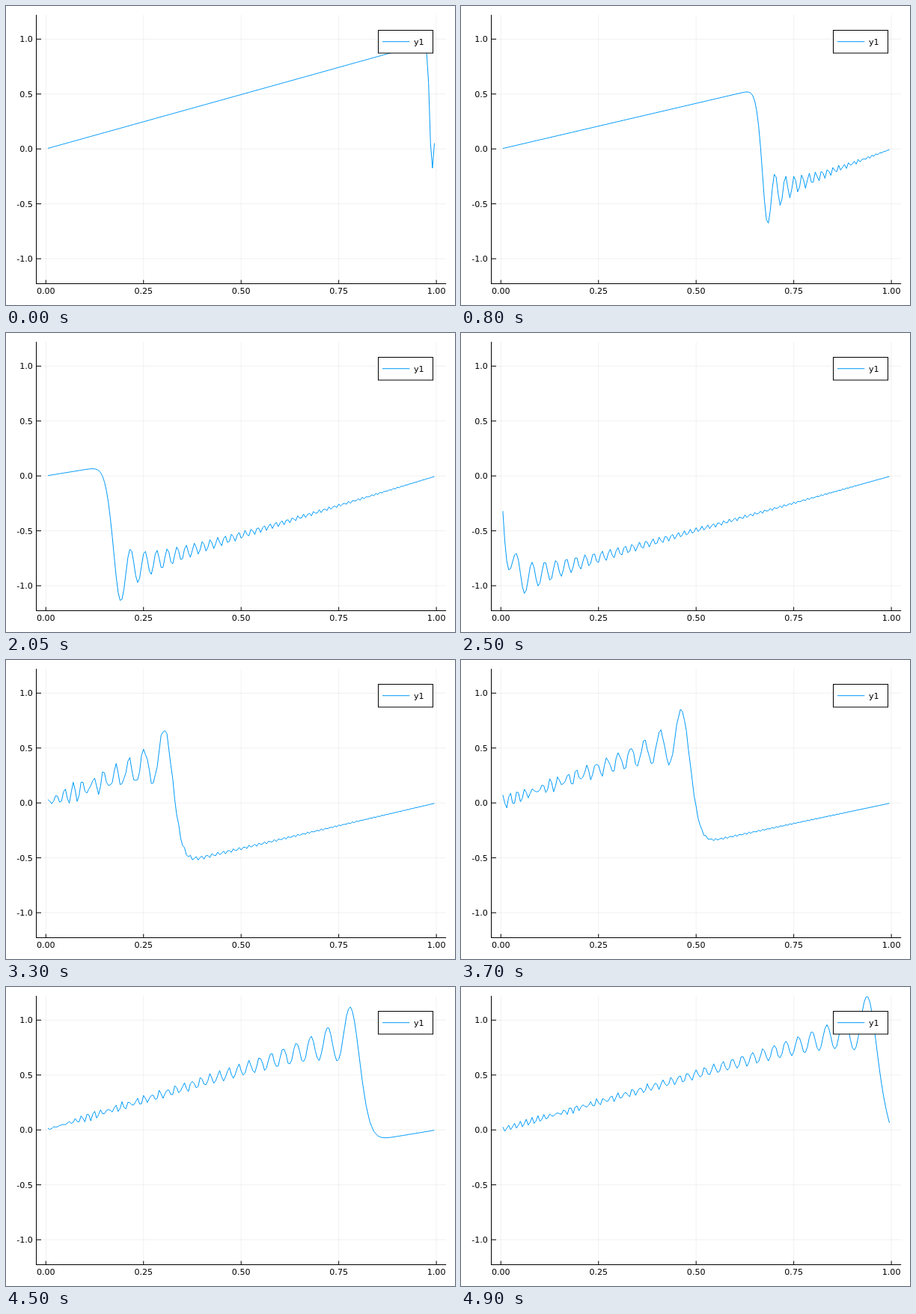
These frames come from a looping animation (600x400 px, 4950 ms). An HTML page:

```html
<!DOCTYPE html>
<html lang="en">
<head>
<meta charset="utf-8">
<title>Wave equation on a lattice</title>
<style>
  html, body { margin: 0; width: 100%; height: 100%; overflow: hidden; background: #fff; }
  svg { display: block; width: 100%; height: 100%; }
  text { font: 11.1px "DejaVu Sans", sans-serif; fill: #000; }
  .grid { stroke: #000; stroke-opacity: .06; }
  .axis { stroke: #000; }
  .wave { stroke: #009afa; fill: none; stroke-linejoin: round; }
</style>
</head>
<body>
<svg viewBox="0 0 600 400">
  <clipPath id="area"><rect x="40.4" y="11.8" width="547.8" height="359.7"/></clipPath>
  <g id="grid" class="grid"></g>
  <g id="axes" class="axis">
    <path d="M40.5 11.8V372M40 371.5H588.2"/>
  </g>
  <g id="labels"></g>
  <polyline id="curve" class="wave" clip-path="url(#area)"/>
  <rect x="497.5" y="32.5" width="73" height="30.5" fill="#fff" class="axis"/>
  <path class="wave" d="M503 47.7H539.3"/>
  <text x="545" y="52">y1</text>
</svg>
<script>
const N = 200, FRAMES = 99, STEP = 50, DT = 0.02;
const px = x => 53.3 + 521.8 * x;
const py = y => 191.2 - 146.9 * y;
const $ = id => document.getElementById(id);

function add(parent, tag, attrs, text = '') {
  const el = document.createElementNS('http://www.w3.org/2000/svg', tag);
  for (const key in attrs) el.setAttribute(key, attrs[key]);
  el.textContent = text;
  $(parent).append(el);
}

for (const v of [0, 0.25, 0.5, 0.75, 1]) {
  const x = px(v);
  add('grid', 'path', { d: `M${x} 11.8V371` });
  add('axes', 'path', { d: `M${x} 371.5V366.5` });
  add('labels', 'text', { x, y: 385, 'text-anchor': 'middle' }, v.toFixed(2));
}
for (const v of [-1, -0.5, 0, 0.5, 1]) {
  const y = py(v);
  add('grid', 'path', { d: `M41 ${y}H588.2` });
  add('axes', 'path', { d: `M40.5 ${y}H47` });
  add('labels', 'text', { x: 35.8, y: y + 4.1, 'text-anchor': 'end' }, v.toFixed(1));
}

// Sine modes of u'' = N²(u[j+1] - 2u[j] + u[j-1]), fixed ends, u = x and u' = -x/2 at t = 0
const sine = Array.from({ length: 2 * N }, (_, i) => Math.sin(Math.PI * i / N));
const modes = Array.from({ length: N - 1 }, (_, i) => {
  const k = i + 1, half = Math.PI * k / (2 * N);
  return { k, w: 2 * N * Math.sin(half), b: (k % 2 ? 1 : -1) / (N * Math.tan(half)) };
});

function wavePoints(t) {
  const amps = modes.map(({ w, b }) => b * (Math.cos(w * t) - Math.sin(w * t) / (2 * w)));
  const pts = [];
  for (let j = 1; j < N; j++) {
    let u = 0;
    modes.forEach(({ k }, i) => { u += amps[i] * sine[k * j % (2 * N)]; });
    pts.push(px(j / N).toFixed(2) + ',' + py(u).toFixed(2));
  }
  return pts.join(' ');
}

const start = performance.now();
let shown = -1;
function draw() {
  const frame = Math.floor((performance.now() - start) / STEP) % FRAMES;
  if (frame !== shown) {
    $('curve').setAttribute('points', wavePoints(DT * (frame + 1)));
    shown = frame;
  }
  requestAnimationFrame(draw);
}
draw();
</script>
</body>
</html>
```
